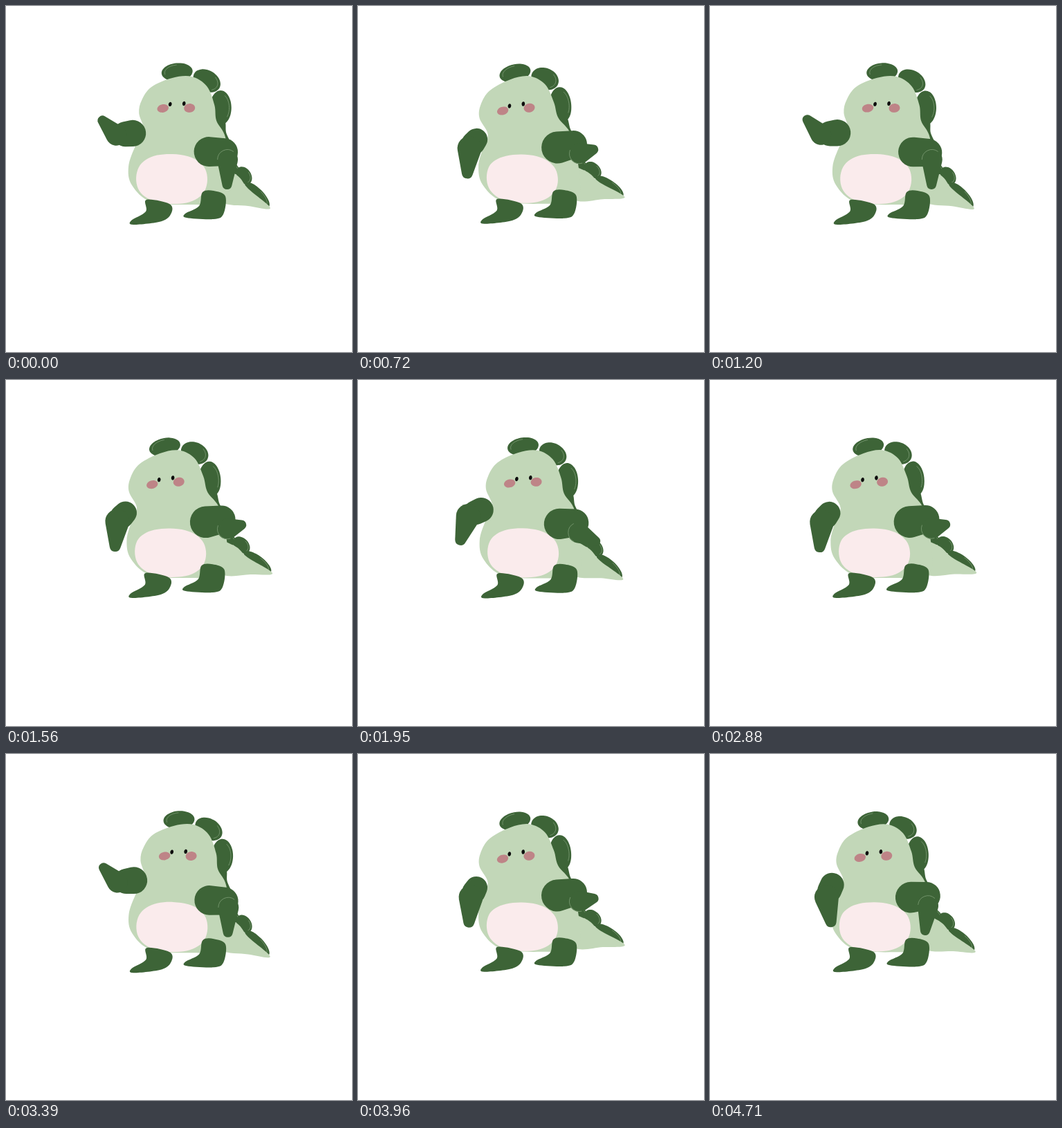
Recreate the animation shown at these times as an HTML page. Size 500x500 px, loop 4.74 s.

```html
<!DOCTYPE html>
<html lang="en">
<head>
<meta charset="utf-8">
<title>Dancing dino</title>
<style>
html, body { margin: 0; width: 100%; height: 100%; overflow: hidden; background: #fff; }
svg { display: block; width: 100vw; height: 100vh; }
.light { fill: #c2d7b8; }
.dark { fill: #3d6437; }
.belly { fill: #faebec; }
.blush { fill: #be8487; }
.eye { fill: #0c0c0c; }
.line { fill: none; stroke: #86a67e; stroke-width: 1; stroke-linecap: round; opacity: .7; }
</style>
</head>
<body>
<svg id="dino" viewBox="0 0 500 500"></svg>
<script>
const LOOP = 4740, FRAME = 30;
const BEAT = 1080, FIRST = 75, REST_AT = FIRST + 3.5 * BEAT;
const REST = { lean: .55, upper: 246, fore: 280, right: 97 };
const dino = document.getElementById('dino');

const clamp = (v, a = 0, b = 1) => Math.max(a, Math.min(b, v));
const ease = v => { v = clamp(v); return v * v * (3 - 2 * v); };
const mix = (a, b, k) => a + (b - a) * k;
const rad = d => d * Math.PI / 180;
const n = v => v.toFixed(2);
const polar = (x, y, r, deg) => [x + r * Math.cos(rad(deg)), y + r * Math.sin(rad(deg))];

// Sway on the beat, then settle into the rest pose
function poseAt(t) {
  const time = Math.min(t, REST_AT);
  const beat = (time - FIRST) / BEAT * 2 * Math.PI;
  const sway = (1 - Math.cos(beat - .19 * Math.sin(beat))) / 2;
  const dance = {
    lean: -.05 + 1.22 * sway - .00004 * time,
    upper: 186 + 54 * sway ** 1.3,
    fore: 132 + 133 * ease(1.8 * sway),
    right: 91 - 107 * ease(1.9 * (sway - .15))
  };
  const calm = ease((t - REST_AT) / (LOOP - REST_AT));
  for (const k in dance) dance[k] = mix(dance[k], REST[k], calm);
  return dance;
}

// Upper body slides and tilts, the feet hardly move
const bend = s => (x, y) => [
  x - s * (1.5 + 19 / (1 + Math.exp((y - 182) / 20))),
  y + s * ((262 - x) * .1 * clamp((230 - y) / 60) - 1.2 * clamp((y - 220) / 60))
];
const wag = s => (x, y) => {
  const a = rad(-11 * s * (.4 + .6 * s)), dx = x - 300, dy = y - 265;
  return [300 + dx * Math.cos(a) - dy * Math.sin(a), 265 + dx * Math.sin(a) + dy * Math.cos(a)];
};

// Points along a tilted superellipse, whole or in part
function oval(cx, cy, rx, ry, tilt = 0, power = 2, from = 0, to = 360) {
  const pts = [], c = Math.cos(rad(tilt)), s = Math.sin(rad(tilt));
  const round = v => Math.sign(v) * Math.abs(v) ** (2 / power);
  const steps = to - from === 360 ? 16 : 6;
  for (let i = 0; i < (steps === 16 ? steps : steps + 1); i++) {
    const a = rad(from + (to - from) * i / steps);
    const x = rx * round(Math.cos(a)), y = ry * round(Math.sin(a));
    pts.push(cx + x * c - y * s, cy + x * s + y * c);
  }
  return pts;
}

// Catmull-Rom curve through warped points
function curve(flat, warp, open) {
  const p = [];
  for (let i = 0; i < flat.length; i += 2) p.push(warp(flat[i], flat[i + 1]));
  const c = p.length;
  const at = i => open ? p[clamp(i, 0, c - 1)] : p[(i + c) % c];
  let d = `M${p[0].map(n)}`;
  for (let i = 0; i < (open ? c - 1 : c); i++) {
    const [a, b, e, f] = [at(i - 1), at(i), at(i + 1), at(i + 2)];
    d += `C${b.map((v, j) => n(v + (e[j] - a[j]) / 6))} ${e.map((v, j) => n(v - (f[j] - b[j]) / 6))} ${e.map(n)}`;
  }
  return open ? d : d + 'Z';
}

// Tapered capsule between two circles
function limb(x1, y1, r1, x2, y2, r2) {
  const th = Math.atan2(y2 - y1, x2 - x1);
  const b = Math.acos(clamp((r1 - r2) / Math.hypot(x2 - x1, y2 - y1), -1, 1));
  const on = (x, y, r, a) => `${n(x + r * Math.cos(a))} ${n(y + r * Math.sin(a))}`;
  const wide = b > Math.PI / 2 ? 1 : 0;
  return `M${on(x1, y1, r1, th - b)}L${on(x2, y2, r2, th - b)}`
    + `A${n(r2)} ${n(r2)} 0 ${wide} 1 ${on(x2, y2, r2, th + b)}L${on(x1, y1, r1, th + b)}`
    + `A${n(r1)} ${n(r1)} 0 ${1 - wide} 1 ${on(x1, y1, r1, th - b)}Z`;
}

function add(cls) {
  const el = document.createElementNS('http://www.w3.org/2000/svg', 'path');
  el.setAttribute('class', cls);
  return dino.appendChild(el);
}

const parts = [];
const shape = (cls, move, pts) => parts.push({ el: add(cls), move, pts, open: cls === 'line' });
function spike(move, cx, cy, rx, ry, tilt, from) {
  shape('dark', move, oval(cx, cy, rx, ry, tilt));
  shape('line', move, oval(cx, cy, rx * .8, ry * .8, tilt, 2, from, from + 100));
}

// Tail
spike(wag, 325, 233, 14, 8, 35, -90);
spike(wag, 344, 245, 14, 10, 55, -90);
spike(wag, 363, 273, 24, 9, 46, -90);
shape('light', wag, [295, 225, 333, 244, 350, 264, 382, 292, 350, 289, 310, 283, 285, 250]);

// Back spikes
shape('dark', bend, [303, 160, 316, 166, 318, 183, 325, 200, 310, 192]);
spike(bend, 310, 147, 15.5, 25, 0, -60);
spike(bend, 290, 108, 21, 15, 30, -60);
spike(bend, 247, 95.5, 22.5, 13, -5, 170);

// Body
shape('light', bend, [192, 155, 196, 136, 210, 117, 240, 104, 268, 102, 290, 116, 301, 143, 304, 166,
  317, 190, 322, 240, 318, 282, 268, 287, 210, 283, 182, 259, 177, 232, 187, 202, 199, 180]);
shape('belly', bend, oval(239.5, 250, 51.5, 36, 2, 2.3));

// Feet
shape('dark', bend, [203, 280, 236, 286, 239, 299, 225, 311, 184, 316, 181, 310, 202, 297]);
shape('dark', bend, [284, 269, 300, 267, 317, 275, 314, 301, 300, 308, 261, 306, 259, 300, 279, 289]);

// Face
shape('blush', bend, oval(226.5, 148, 8.3, 5.8, -12));
shape('blush', bend, oval(265, 147.5, 8, 6.4, -8));
shape('eye', bend, oval(237, 142, 2.3, 3.2, 15));
shape('eye', bend, oval(257, 141, 2.3, 3.2, 10));

// Arms
const [leftUpper, leftFore, rightUpper, rightFore] = Array.from({ length: 4 }, () => add('dark'));
const elbowLine = add('line');

function drawLeft(s, upper, fore) {
  const drop = clamp((fore - 150) / 100);
  const sx = 183 - 12 * s, sy = 184 + 9 * s;
  const [ex, ey] = polar(sx, sy, mix(24, 16, clamp(s)), -upper);
  const [hx, hy] = polar(ex, ey, mix(29, 36, drop), -fore);
  leftUpper.setAttribute('d', limb(sx, sy, 19 - 3 * s, mix(sx, ex, .45), mix(sy, ey, .45), 18 - s));
  leftFore.setAttribute('d', limb(ex, ey, mix(15, 17.5, drop), hx, hy, mix(7, 8, drop)));
}

function drawRight(s, ang) {
  const bentDown = Math.max(0, Math.sin(rad(ang)));
  const ex = 320 - 9 * s * bentDown, ey = 222 - 9 * s * s;
  const [hx, hy] = polar(ex, ey, 21 + 15 * bentDown, ang);
  rightUpper.setAttribute('d', limb(293 - 5 * s, 210.5 - 6 * s, 21.5 + 1.5 * s, 315 - 4 * s, 211 - 11 * s, 20));
  rightFore.setAttribute('d', limb(ex, ey, 15, hx, hy, 7));
  const rim = d => polar(ex, ey, 14.5, ang + d).map(n);
  elbowLine.setAttribute('d', `M${rim(90)}A14.5 14.5 0 0 1 ${rim(215)}`);
}

function draw(t) {
  const pose = poseAt(t);
  for (const p of parts) p.el.setAttribute('d', curve(p.pts, p.move(pose.lean), p.open));
  drawLeft(pose.lean, pose.upper, pose.fore);
  drawRight(pose.lean, pose.right);
}

const start = performance.now();
function tick(now) {
  const t = Math.max(0, now - start) % LOOP;
  draw(Math.floor(t / FRAME) * FRAME);
  requestAnimationFrame(tick);
}
draw(0);
requestAnimationFrame(tick);
</script>
</body>
</html>
```
